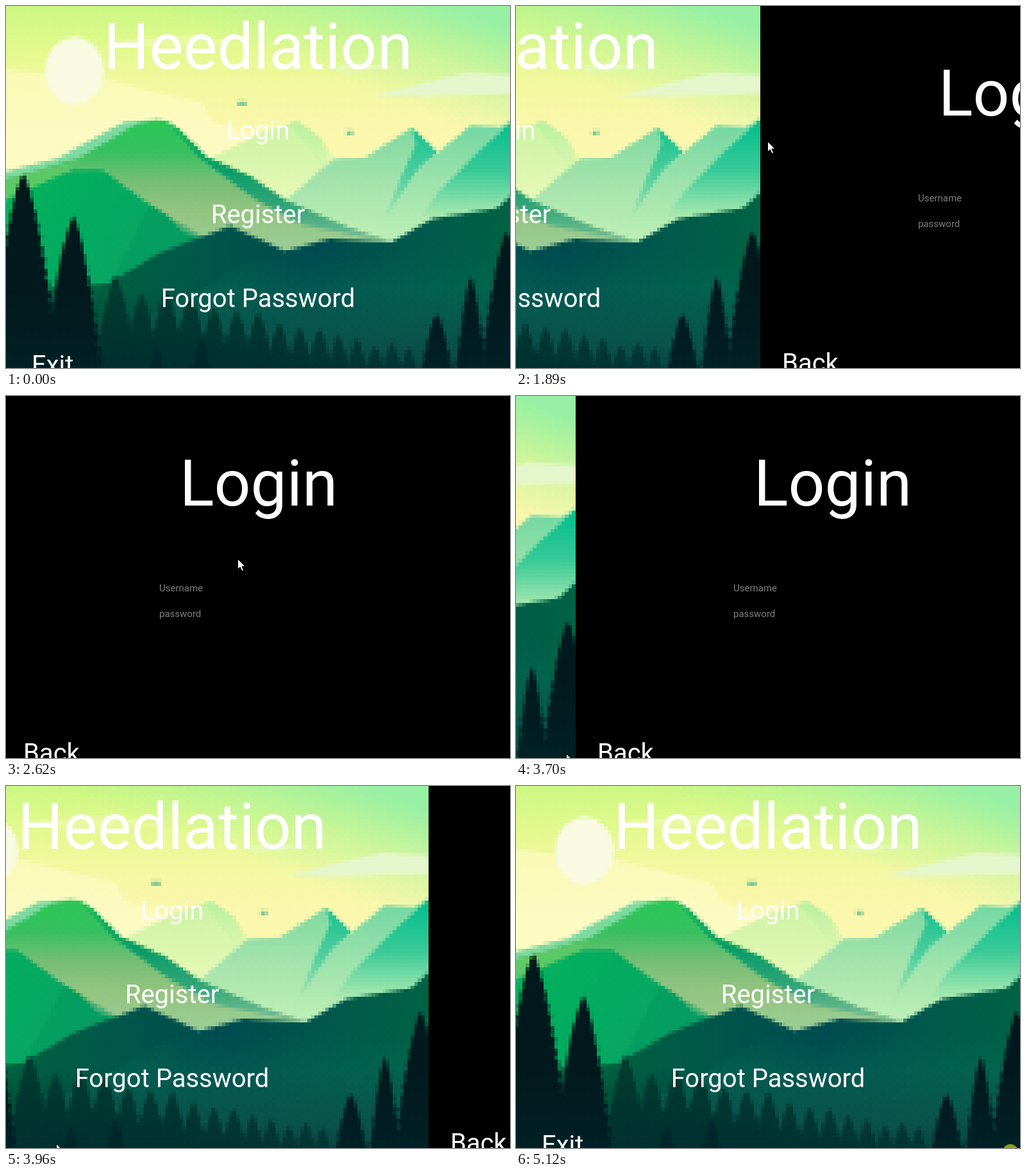
Animation, 786 px wide and 565 px high, one loop 5200 ms. Source, as an HTML page with a canvas:

```html
<!DOCTYPE html>
<html lang="en">
<head>
<meta charset="utf-8">
<title>Menu</title>
<style>
  html, body { margin: 0; height: 100%; overflow: hidden; background: #000; }
  canvas { display: block; }
</style>
</head>
<body>
<canvas id="stage" width="786" height="565"></canvas>
<script>
const LOOP = 5200, LEFT = -7, WIDTH = 800, HEIGHT = 600, CENTER = LEFT + WIDTH / 2;
const ctx = document.getElementById('stage').getContext('2d');

let seed = 7;
const random = () => (seed = seed * 16807 % 2147483647) / 2147483647;

// Landscape painted on a coarse grid, then enlarged without smoothing.
function paintScene(cols, rows) {
  const canvas = document.createElement('canvas');
  canvas.width = cols;
  canvas.height = rows;
  const g = canvas.getContext('2d');
  g.scale(cols / WIDTH, rows / HEIGHT);
  g.translate(-LEFT, 0);

  const blend = (x0, y0, x1, y1, ...colors) => {
    const fill = g.createLinearGradient(x0, y0, x1, y1);
    colors.forEach((c, i) => fill.addColorStop(i / (colors.length - 1), c));
    return fill;
  };
  const down = (y0, y1, ...colors) => blend(0, y0, 0, y1, ...colors);
  const across = (...colors) => blend(0, 0, 794, 0, ...colors);
  const shape = (fill, points) => {
    g.fillStyle = fill;
    g.fill(new Path2D(`M${points}Z`));
  };
  const ridge = (fill, crest) => shape(fill, `-7 600L${crest}L794 600`);
  const all = fill => ridge(fill, '-7 0H794');
  const bird = (x, y, w) => {
    g.fillStyle = '#6cc291';
    g.fillRect(x, y, w, 6);
  };
  // Conifer: widens downwards, with every second step drawn in.
  const tree = (fill, x, top, spread) => {
    let left = '', right = '';
    for (let d = 0, i = 0; d <= HEIGHT - top; d += 9, i++) {
      const half = spread * (d / 240) ** .7 * (i % 2 ? 1.06 : .9);
      left = `${x - half} ${top + d}L${left}`;
      right += `${x + half} ${top + d}L`;
    }
    shape(fill, left + right.slice(0, -1));
  };

  // Sky
  all(down(0, 200, '#cbf783', '#e3f98e', '#f5f8a2', '#fbf7ae'));
  all(blend(640, -20, 580, 140, '#98f0a4', '#a4f0a466', '#a4f0a400'));
  shape(down(98, 200, '#f8fab4', '#fdfac2'), '-7 98L165 117 305 152 320 180 400 205V260H-7');
  shape('#f4fbc06b', '165 55L290 44 385 61 225 66');
  shape('#e9f8cba0', '505 96L545 90 615 97 525 102');
  shape('#e6f6cc', '567 141L690 111 720 104 794 108V137L650 142');
  g.fillStyle = '#f8fae2';
  g.beginPath();
  g.ellipse(107, 101, 46, 53, 0, 0, 7);
  g.fill();
  bird(361, 149, 14);
  bird(531, 195, 10);

  // Distant peaks, each with a shaded face
  ridge(down(180, 310, '#cbf3a2', '#e8f9b8'), '308 243L400 197 455 180 490 205 530 330');
  shape(down(180, 310, '#b8f0a0', '#e8f9b800'), '440 183L455 180 490 205 512 240 440 310 490 245');
  ridge(down(190, 365, '#7ed8a0', '#a5e3ad', '#bfefb6'), '430 308L512 238 560 237 632 190 672 228 700 370');
  shape(down(190, 340, '#14c090', '#50ce9e', '#b0e9b3'), '634 190L672 228 645 252 588 337 615 270 640 215');
  ridge(down(186, 365, '#74d7a2', '#9de2ab', '#bdefb7'), '588 338L645 252 725 186 770 189 794 176');
  shape(down(180, 335, '#00bd8b', '#39ca98', '#b3ebb2'), '794 176L735 230 675 290 632 348 794 330');

  // Green hills
  const slope = '250 179L272 194 312 235 380 266 435 303 535 346 600 368';
  ridge('#7dd9a0', '-7 260L80 238 185 181 235 178 300 300 600 600');
  ridge(down(178, 370, '#2bc657', '#36c05f', '#76be75', '#94c480', '#9acb92'),
    '-7 272L115 237 205 183 235 178 ' + slope);
  shape(down(195, 365, '#12b15f', '#079d67', '#2ea477', '#75bd91'), slope + ' 460 342 380 295 300 235');
  shape('#5cc966', '-7 272L115 242 60 282 -7 302');
  ridge(blend(30, 260, 260, 430, '#05b15c', '#04aa60', '#0da067'),
    '-7 305L105 256 150 256 210 300 250 326 275 352 330 370');
  shape('#00985f80', '225 312L310 362 195 415 170 420');

  // Front ridge
  ridge(across('#00683f', '#00603f', '#00564a', '#004a50', '#00584c', '#006343'),
    '-7 445L160 432 240 385 350 343 435 382 505 363 600 369 665 332 765 316 794 291');
  ridge(down(380, 530, '#00665000', '#107060'), '310 440L400 385 794 340');

  // Forest
  const woods = across('#003a2e', '#003e34', '#064a46');
  for (let x = 171; x < 650; x += 46 - x / 30) {
    tree(woods, x, 430 + (x - 171) * .23 + random() * 20 - 10, 50);
  }
  tree('#00272a', 235, 530, 45);
  tree('#00272a', 305, 518, 45);
  tree('#043f31', 92, 372, 36);
  const dark = '#01191c';
  tree(dark, 27, 262, 50);
  tree(dark, 105, 328, 46);
  tree(dark, 672, 480, 50);
  tree(dark, 725, 422, 34);
  tree(dark, 781, 352, 46);
  all(down(440, 600, '#00202600', '#002a2fbb'));
  return canvas;
}
const scene = paintScene(144, 104);

const easeOut = p => p * (2 - p);
const progress = (t, start, end) => Math.min(1, Math.max(0, (t - start) / (end - start)));
const slide = (t, start) => easeOut(progress(t, start, start + 494));

// Pointer moves: start, end, from x, y, to x, y, height of the arc
const moves = [
  [150, 640, 703, 572, 393, 214, 0],
  [1050, 1230, 393, 214, 392, 211, 0],
  [2160, 2470, 392, 211, 391, 214, 0],
  [2600, 2960, 391, 214, 128, 568, 0],
  [3340, 3530, 74, 567, 78, 558, 0],
  [4180, 4450, 78, 558, 620, 567, 104],
  [4590, 4940, 618, 567, 771, 571, 58]
];
const clicks = [[640, 740], [1620, 1730], [3530, 3670], [5120, 5200]];
const arrow = new Path2D('M.5 .5V16.5L4.2 13 7 19.3 9.6 18.2 6.9 12H12Z');

function label(text, x, y, size, align = 'center', color = '#fff') {
  ctx.font = `${size}px Roboto, sans-serif`;
  ctx.textAlign = align;
  ctx.fillStyle = color;
  ctx.fillText(text, x, y);
}

function drawHome() {
  ctx.imageSmoothingEnabled = false;
  ctx.drawImage(scene, LEFT, 0, WIDTH, HEIGHT);
  label('Heedlation', CENTER, 98, 100);
  ['Login', 'Register', 'Forgot Password'].forEach((text, i) => label(text, CENTER, 208 + 131 * i, 40));
  label('Exit', 40, 574, 40, 'left');
}

function drawLogin() {
  ctx.fillStyle = '#000';
  ctx.fillRect(LEFT, 0, WIDTH, HEIGHT);
  label('Login', CENTER + 1, 171, 100);
  label('Username', 239, 305, 15, 'left', '#7f7f7f');
  label('password', 239, 345, 15, 'left', '#7f7f7f');
  label('Back', 27, 571, 40, 'left');
}

function at(x, y, draw) {
  ctx.save();
  ctx.translate(x, y);
  draw();
  ctx.restore();
}

function drawPointer(t) {
  const move = moves.filter(([start]) => start <= t).pop();
  if (!move) return;
  const [start, end, x0, y0, x1, y1, lift] = move;
  const p = easeOut(progress(t, start, end));
  const x = x0 + (x1 - x0) * p;
  const y = y0 + (y1 - y0) * p - lift * Math.sin(Math.PI * p);
  at(Math.round(x), Math.round(y), () => {
    if (clicks.some(([from, to]) => t >= from && t < to)) {
      ctx.fillStyle = 'rgba(255, 255, 0, .56)';
      ctx.beginPath();
      ctx.arc(0, 0, 12, 0, 7);
      ctx.fill();
    }
    ctx.fillStyle = '#fff';
    ctx.strokeStyle = '#000';
    ctx.fill(arrow);
    ctx.stroke(arrow);
  });
}

function render(now) {
  const t = now % LOOP;
  const shift = Math.round(WIDTH * (slide(t, 1741) - slide(t, 3669)));
  at(-shift, 0, drawHome);
  at(WIDTH - shift, 0, drawLogin);
  drawPointer(t);
  requestAnimationFrame(render);
}
requestAnimationFrame(render);
</script>
</body>
</html>
```
